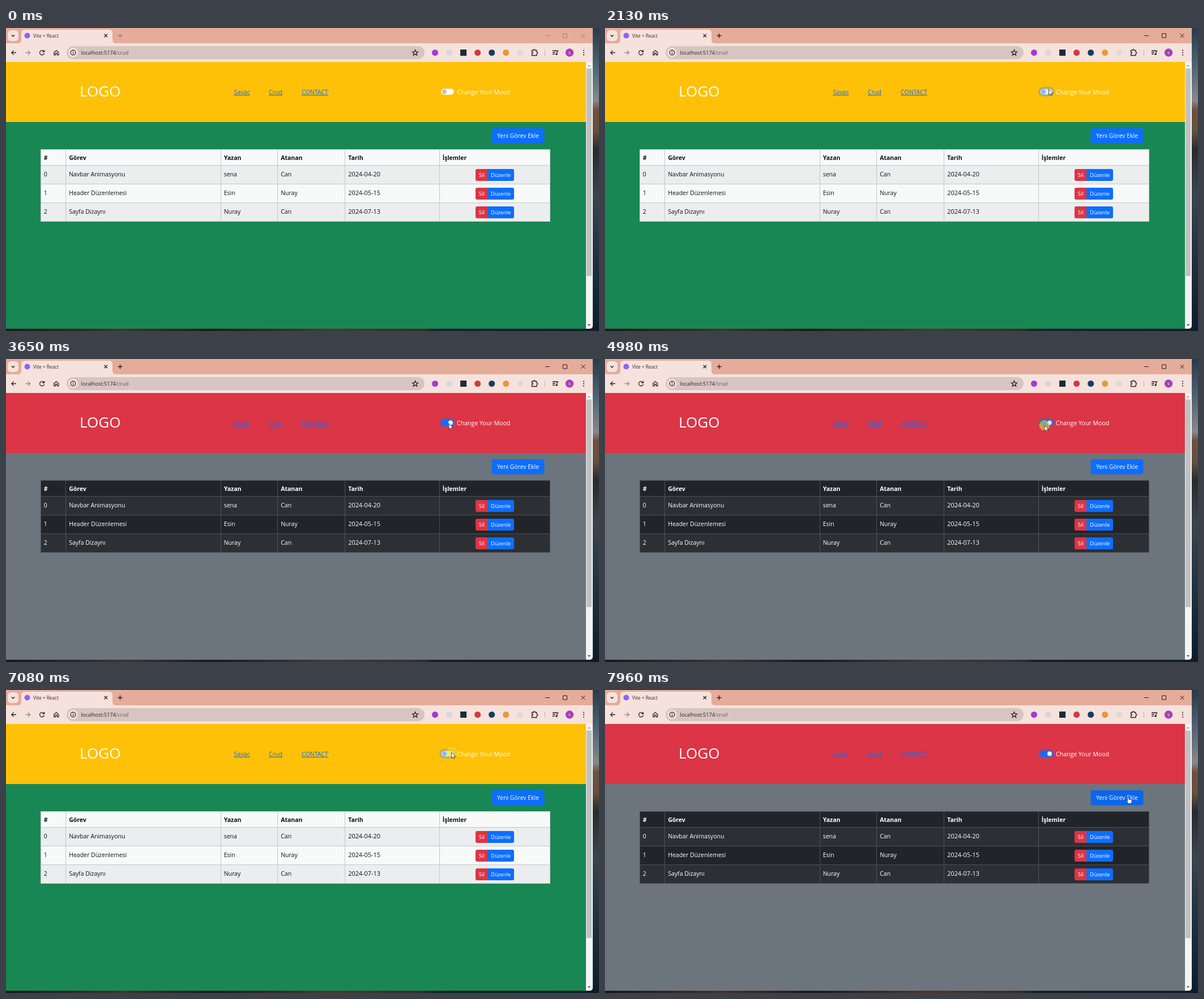
Write an HTML page that moves like this. It is 1047 px wide and 535 px high and loops after 8 s.

```html
<!DOCTYPE html>
<html lang="tr">
<head>
<meta charset="utf-8">
<title>Vite + React</title>
<style>
html, body { margin: 0; width: 100%; height: 100%; overflow: hidden; background: #1b2630; }
svg {
  display: block; width: 100%; height: 100%; font-family: "Open Sans", "Noto Sans", sans-serif;
  --page: #198754; --head: #ffc107; --cell: #f8faf9; --odd: #ecedee; --line: #c6c7c8; --ink: #111;
}
svg.dark { --page: #6c757d; --head: #dc3545; --cell: #212529; --odd: #2c3034; --line: #4d5154; --ink: #fff; }
.page { fill: var(--page); } .head { fill: var(--head); }
.cell { fill: var(--cell); } .odd { fill: var(--odd); }
.grid { stroke: var(--line); fill: none; } .ink { fill: var(--ink); }
.icon { fill: none; stroke: #2b2322; stroke-width: 1.3; }
#chrome { stroke: #251d1b; fill: none; }
#chrome.idle { stroke: #a17e74; }
</style>
</head>
<body>
<svg id="stage" viewBox="0 0 1047 535" preserveAspectRatio="none">
  <defs>
    <linearGradient id="hills" x2="0" y2="1">
      <stop offset="0" stop-color="#263c4d"/>
      <stop offset=".12" stop-color="#4d6272"/>
      <stop offset=".24" stop-color="#87888c"/>
      <stop offset=".27" stop-color="#70503f"/>
      <stop offset=".34" stop-color="#65503f"/>
      <stop offset=".4" stop-color="#292b2e"/>
      <stop offset=".55" stop-color="#3a454e"/>
      <stop offset=".7" stop-color="#263643"/>
      <stop offset="1" stop-color="#0d1c2a"/>
    </linearGradient>
    <linearGradient id="shore">
      <stop offset="0" stop-color="#17181c"/>
      <stop offset=".2" stop-color="#44332d"/>
      <stop offset=".35" stop-color="#1d1a1c"/>
      <stop offset=".55" stop-color="#4a3830"/>
      <stop offset=".71" stop-color="#372d2b"/>
      <stop offset=".73" stop-color="#17212b"/>
      <stop offset="1" stop-color="#101d2a"/>
    </linearGradient>
    <clipPath id="frame"><rect x="-8" y="-8" width="1044" height="539" rx="5"/></clipPath>
  </defs>
  <rect x="1030" width="17" height="535" fill="url(#hills)"/>
  <rect y="525" width="1036" height="10" fill="url(#shore)"/>
  <g id="window" clip-path="url(#frame)"></g>
  <circle id="press" r="9.3" fill="#f2e52e" opacity=".55"/>
  <path id="arrow" d="M0 0V10.2L2.4 8.1 4 11.7 5.7 10.9 4.2 7.5H7.3Z" fill="#fff" stroke="#222" stroke-width=".8"/>
  <path id="hand" d="M-1 1Q0-.5 1 1V5L5 5.7Q6.5 6.2 6.3 8L5.5 12.5H.2L-3 8.3Q-3.2 6.6-1 7.5Z" fill="#fff" stroke="#222" stroke-width=".8"/>
</svg>
<script>
const NS = "http://www.w3.org/2000/svg";
const $ = id => document.getElementById(id);
const win = $("window"), stage = $("stage");

function add(tag, attrs, parent = win) {
  const el = document.createElementNS(NS, tag);
  for (const key in attrs) el.setAttribute(key, attrs[key]);
  return parent.appendChild(el);
}
const set = (el, attrs) => { for (const key in attrs) el.setAttribute(key, attrs[key]); };
const rect = (x, y, width, height, more) => add("rect", { x, y, width, height, ...more });
const dot = (cx, cy, r, fill, more) => add("circle", { cx, cy, r, fill, ...more });
const path = (d, more = { class: "icon" }, parent = win) => add("path", { d, ...more }, parent);
function text(str, x, y, size, more) {
  const el = add("text", { x, y, "font-size": size, ...more });
  el.textContent = str;
  return el;
}

function drawBrowser() {
  rect(0, 0, 1036, 60, { fill: "#e5ac99" });
  rect(0, 27, 1036, 33, { fill: "#f6e2dc" });
  rect(3, 4, 19, 19, { rx: 6, fill: "#f6e2dc" });
  path("M9.8 12.2 12.5 15 15.2 12.2");
  path("M21 27Q27 27 27 21V9Q27 3 33 3H182Q188 3 188 9V21Q188 27 194 27Z", { fill: "#f6e2dc" });
  dot(37.5, 13.5, 5, "#8e63f5");
  text("Vite + React", 48, 17, 8.3, { fill: "#382d2a" });
  path("M173.6 10.8 179 16.2M179 10.8 173.6 16.2");

  const chrome = add("g", { id: "chrome" });
  path("M197.5 13.5H205.5M201.5 9.5V17.5", { "stroke-width": 1.3 }, chrome);
  path("M952 13.5H960M983.5 10H990.5V17H983.5ZM1015.5 10 1022.5 17M1022.5 10 1015.5 17", {}, chrome);

  path("M18 43.5H10M13.7 39.6 9.8 43.5 13.7 47.4");
  path("M34.5 43.5H42.5M38.8 39.6 42.7 43.5 38.8 47.4", { class: "icon", opacity: .45 });
  path("M67 41.5A4 4 0 1 0 67.5 44.3M67.6 38.8V42H64.4");
  path("M84.8 43 88.8 39.5 92.8 43V47.7H90.3V44.5H87.3V47.7H84.8Z");

  rect(107, 32, 632, 23, { rx: 11.5, fill: "#d6c5c0" });
  dot(118.5, 43.5, 8.3, "#f6e2dc");
  dot(118.5, 43.5, 4.3, "none", { class: "icon" });
  path("M118.5 43V46M118.5 40.8V42");
  const url = text("localhost:5174", 132.5, 47, 9.1, { fill: "#2b2322" });
  const tail = add("tspan", { fill: "#675752" }, url);
  tail.textContent = "/crud";
  let star = "M";
  for (let i = 0; i < 10; i++) {
    const r = i % 2 ? 2.3 : 5.2, a = i * Math.PI / 5 - Math.PI / 2;
    star += `${(722.5 + r * Math.cos(a)).toFixed(1)} ${(43.8 + r * Math.sin(a)).toFixed(1)} `;
  }
  path(star + "Z", { class: "icon", "stroke-width": 1 });

  const badges = ["#a63bd0", "#dcd7d6", 0, "#d13a3f", "#173d5e", "#e59a35", "#dedbd8"];
  badges.forEach((fill, i) => {
    const x = 757.5 + i * 25.05;
    if (fill) dot(x, 43.5, 5.5, fill);
    else rect(x - 5.5, 38, 11, 11, { fill: "#182d38" });
  });
  path("M928.5 39.5H931.5Q931.3 37.7 932.8 37.7T934.2 39.5H937V42.5Q938.8 42.4 938.8 43.9T937 45.4V48.5H928.5V45.2Q930.5 45 930.5 43.8T928.5 42.5Z");
  path("M951.5 38V49", { stroke: "#cfaea5" });
  path("M965 40H973M965 43H970M965 46H969M973 46V40.5H975.5");
  dot(972, 46.2, 1.6, "#2b2322");
  dot(995, 43.5, 7.2, "#a640b8");
  text("s", 995, 46.2, 8, { fill: "#fff", "text-anchor": "middle" });
  for (const y of [39.5, 43.5, 47.5]) dot(1020, y, 1.1, "#2b2322");
}

function drawPage() {
  rect(0, 60, 1024, 471, { class: "page" });
  rect(0, 60, 1024, 106, { class: "head" });
  rect(1024, 60, 12, 471, { fill: "#f3f3f3" });
  rect(1025, 71.5, 9, 366.5, { fill: "#c1c1c1" });
  path("M1027 68 1029.5 65 1032 68Z", { fill: "#a0a0a0" });
  path("M1027 523 1029.5 526 1032 523Z", { fill: "#505050" });

  text("LOGO", 130, 121, 26, { fill: "#fff", "font-weight": 500 });
  [["Sayac", 402.5], ["Crud", 464], ["CONTACT", 522]].forEach(([label, x]) =>
    text(label, x, 117, 10.6, { fill: "#0d6efd", "font-weight": 500, "text-decoration": "underline" }));
  text("Change Your Mood", 796, 116.8, 10.6, { fill: "#fff" });
}

function drawTable() {
  const cols = [61, 105.5, 379, 479.5, 598.5, 765];
  const tops = [214, 243, 276, 309];
  const rows = [
    ["#", "Görev", "Yazan", "Atanan", "Tarih", "İşlemler"],
    ["0", "Navbar Animasyonu", "sena", "Can", "2024-04-20"],
    ["1", "Header Düzenlemesi", "Esin", "Nuray", "2024-05-15"],
    ["2", "Sayfa Dizaynı", "Nuray", "Can", "2024-07-13"]
  ];
  rows.forEach((row, r) => {
    const top = tops[r];
    rect(61, top, 900, (tops[r + 1] || 342) - top, { class: r % 2 ? "odd" : "cell" });
    row.forEach((label, c) => text(label, cols[c] + 5.7, top + (r ? 18.5 : 19), r && c === 4 ? 10.9 : 10.5,
      { class: "ink", "font-weight": r ? 400 : 700 }));
    if (!r) return;
    path(`M832 ${top + 6}H850V${top + 27}H832Q829 ${top + 27} 829 ${top + 24}V${top + 9}Q829 ${top + 6} 832 ${top + 6}Z`, { fill: "#dc3545" });
    path(`M850 ${top + 6}H894Q897 ${top + 6} 897 ${top + 9}V${top + 24}Q897 ${top + 27} 894 ${top + 27}H850Z`, { fill: "#0d6efd" });
    const label = { fill: "#fff", "text-anchor": "middle" };
    text("Sil", 839.8, top + 20, 9.5, label);
    text("Düzenle", 873.7, top + 20, 9.2, label);
  });
  path("M61 214.5H961M61 242.5H961M61 275.5H961M61 308.5H961M61 341.5H961", { class: "grid" });
  path(cols.concat(960.5).map(x => `M${Math.floor(x) + .5} 214V342`).join(""), { class: "grid" });
}

drawBrowser();
drawPage();
const addButton = rect(857.5, 177, 93, 26.5, { rx: 4 });
text("Yeni Görev Ekle", 904, 194.2, 10.4, { fill: "#fff", "text-anchor": "middle" });
drawTable();
const ring = rect(765.2, 104.2, 28.6, 16.6, { rx: 8.3, fill: "#0d6efd", opacity: .27 });
const track = rect(768.4, 107.4, 22.2, 10.2, { rx: 5.1, "stroke-width": .8 });
const knob = dot(774, 112.5, 3.9, "#fff");

// Pointer stops: time, x, y
const stops = [
  [70, 1014, 527], [560, 690, 373], [820, 725, 284], [900, 730, 278], [1500, 787, 99], [1700, 783.5, 108],
  [2600, 783.5, 108], [2840, 783.5, 111.5], [2990, 783.5, 111.5], [3050, 783.5, 112.5],
  [3390, 783.5, 112.5], [3400, 782.5, 113.5], [3600, 782.5, 113.5], [3800, 778.5, 114.5],
  [4290, 778.5, 114.5], [4440, 776, 117], [5460, 776, 117], [5750, 774, 122.5], [6080, 809, 112],
  [6290, 797, 111], [6340, 797, 111], [6490, 786.5, 110], [7320, 786.5, 110],
  [7850, 921, 186], [7890, 923, 187.5], [7960, 924, 188]
];
const presses = [[2050, 2130, 2180], [4980, 5110, 5110], [7080, 7150, 7150]];
const clamp = v => Math.max(0, Math.min(1, v));
const ease = v => v * v * (3 - 2 * v);
const mix = (a, b, k) => `rgb(${a.map((v, i) => Math.round(v + (b[i] - v) * k))})`;

function pointerAt(t) {
  const i = stops.findIndex(s => s[0] > t);
  if (i < 0) return stops[stops.length - 1].slice(1);
  if (!i) return stops[0].slice(1);
  const a = stops[i - 1], b = stops[i], k = ease((t - a[0]) / (b[0] - a[0]));
  return [a[1] + (b[1] - a[1]) * k, a[2] + (b[2] - a[2]) * k];
}

function render(t) {
  const focused = t >= 2050;
  const toggles = presses.filter(p => t >= p[2]);
  const on = toggles.length % 2 === 1;
  const active = presses.some(p => t >= p[0] && t < p[2]);
  stage.classList.toggle("dark", on);
  $("chrome").classList.toggle("idle", !focused);

  const slide = toggles.length ? ease(clamp((t - toggles[toggles.length - 1][2]) / 150)) : 1;
  set(ring, { visibility: focused ? "visible" : "hidden" });
  set(track, {
    fill: on ? (active ? "#0c63e4" : "#0d6efd") : (active ? "#e6e7e5" : "#fff"),
    stroke: on ? "#0d6efd" : focused ? "#86b7fe" : "#eee8dc"
  });
  set(knob, {
    cx: 774 + 11 * (on ? slide : 1 - slide),
    fill: on ? (active ? "#e1e8ee" : "#fff") : focused ? "#86b7fe" : "#bfbfbf"
  });

  set(addButton, { fill: mix([13, 110, 253], [11, 94, 215], clamp((t - 7890) / 150)) });

  const [x, y] = pointerAt(t), at = `translate(${x.toFixed(2)} ${y.toFixed(2)})`;
  const lit = presses.some(p => t >= p[0] && t < p[1]);
  set($("press"), { transform: at, visibility: lit ? "visible" : "hidden" });
  set($("arrow"), { transform: at, visibility: t >= 70 && t < 7890 ? "visible" : "hidden" });
  set($("hand"), { transform: at, visibility: t >= 7890 ? "visible" : "hidden" });
}

const start = performance.now();
function tick() {
  render((performance.now() - start) % 8000);
  requestAnimationFrame(tick);
}
render(0);
requestAnimationFrame(tick);
</script>
</body>
</html>
```
